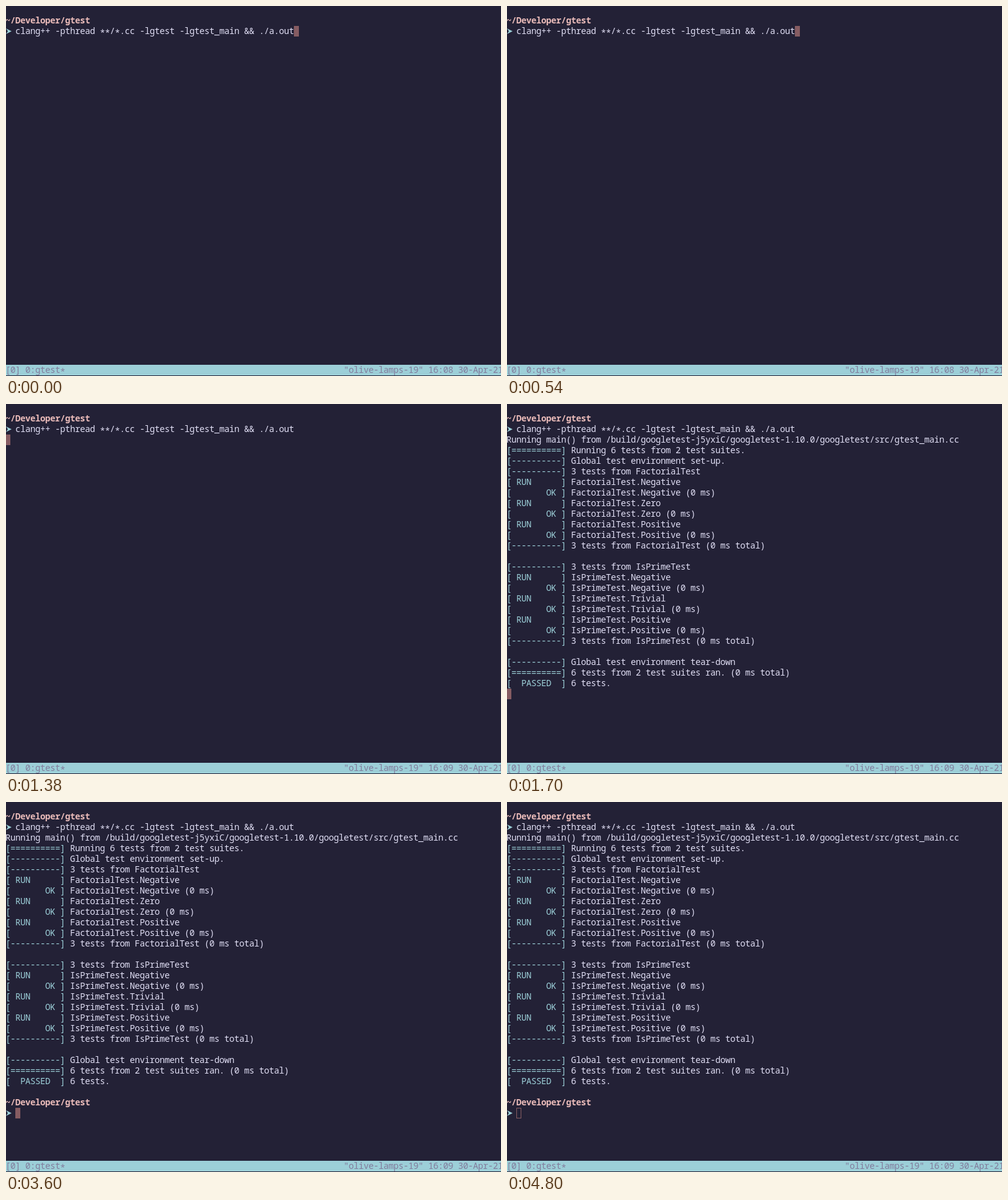
Animation of 796 by 594 pixels, one loop 4.9 s. Source, as an HTML page:

```html
<!DOCTYPE html>
<html lang="en">
<head>
<meta charset="utf-8">
<title>Unit test run</title>
<style>
  html, body { margin: 0; width: 100%; height: 100%; overflow: hidden; background: #232136; }
  svg { display: block; width: 796px; height: 594px; }
  /* 14px glyphs set on an 8px grid */
  text { font: 500 14px "Noto Sans Mono", "DejaVu Sans Mono", monospace; letter-spacing: -0.4px; white-space: pre; fill: #e0def4; }
  .path { font-weight: 700; fill: #ebbcba; }
  .tag { fill: #9ccfd8; }
  .bar { fill: #817c9c; }
</style>
</head>
<body>
<svg id="stage" viewBox="0 0 796 594">
  <rect width="796" height="594" fill="#232136"/>
  <rect y="576" width="796" height="17" fill="#9ccfd8"/>
</svg>
<script>
const LOOP = 4900, CELL = 8, LINE = 17, CURSOR = '#865c62';
const stage = document.getElementById('stage');
const colX = col => col * CELL - 1;
const rowY = row => row * LINE - 2;

function add(parent, name, attrs) {
  const el = document.createElementNS('http://www.w3.org/2000/svg', name);
  for (const key in attrs) el.setAttribute(key, attrs[key]);
  return parent.appendChild(el);
}

// Asterisks sit lower than the font draws them, centred on the line.
function write(parent, row, col, str, cls = '') {
  const el = add(parent, 'text', { x: colX(col), y: rowY(row) + 13, class: cls });
  let shift = 0;
  for (const part of str.split(/(\*+)/).filter(Boolean)) {
    const want = part[0] === '*' ? 2.5 : 0;
    add(el, 'tspan', { dy: want - shift }).textContent = part;
    shift = want;
  }
  return el;
}

function prompt(parent, row) {
  write(parent, row, 0, '~/Developer/gtest', 'path');
  const y = rowY(row + 1) + 8.5;
  add(parent, 'path', { d: `M0 ${y - 4.5}L9 ${y}L0 ${y + 4.5}L3 ${y}Z`, fill: '#9ccfd8' });
}

const rule = '[----------]', doubleRule = '[==========]';

function suite(name, cases) {
  const lines = [[rule, `3 tests from ${name}`]];
  for (const c of cases) {
    lines.push(['[ RUN      ]', `${name}.${c}`], ['[       OK ]', `${name}.${c} (0 ms)`]);
  }
  return [...lines, [rule, `3 tests from ${name} (0 ms total)`], null];
}

const report = [
  [doubleRule, 'Running 6 tests from 2 test suites.'],
  [rule, 'Global test environment set-up.'],
  ...suite('FactorialTest', ['Negative', 'Zero', 'Positive']),
  ...suite('IsPrimeTest', ['Negative', 'Trivial', 'Positive']),
  [rule, 'Global test environment tear-down'],
  [doubleRule, '6 tests from 2 test suites ran. (0 ms total)'],
  ['[  PASSED  ]', '6 tests.']
];

prompt(stage, 1);
write(stage, 2, 2, 'clang++ -pthread **/*.cc -lgtest -lgtest_main && ./a.out');

const output = add(stage, 'g', {});
write(output, 3, 0, 'Running main() from /build/googletest-j5yxiC/googletest-1.10.0/googletest/src/gtest_main.cc');
report.forEach((line, i) => {
  if (!line) return;
  write(output, 4 + i, 0, line[0], 'tag');
  write(output, 4 + i, 13, line[1]);
});

const nextPrompt = add(stage, 'g', {});
prompt(nextPrompt, 28);

write(stage, 34, 0, '[0] 0:gtest*', 'bar');
write(stage, 34, 68, '"olive-lamps-19"', 'bar');
const clock = write(stage, 34, 85, '16:08', 'bar').firstChild;
write(stage, 34, 91, '30-Apr-21', 'bar');

const cursor = add(stage, 'rect', { width: CELL - 1, height: LINE - 1, stroke: CURSOR });

const show = (el, on) => el.setAttribute('visibility', on ? 'visible' : 'hidden');

function cursorCell(t) {
  if (t < 900) return [2, 58];
  if (t < 1700) return [3, 0];
  if (t < 1800) return [27, 0];
  return [29, 2];
}

function draw(t) {
  const [row, col] = cursorCell(t);
  cursor.setAttribute('x', colX(col) + 0.5);
  cursor.setAttribute('y', rowY(row) + 0.5);
  cursor.setAttribute('fill', t < 4800 ? CURSOR : 'none');
  clock.textContent = t < 900 ? '16:08' : '16:09';
  show(output, t >= 1700);
  show(nextPrompt, t >= 1800);
}

const start = performance.now();
function tick() {
  draw((performance.now() - start) % LOOP);
  requestAnimationFrame(tick);
}
tick();
</script>
</body>
</html>
```
